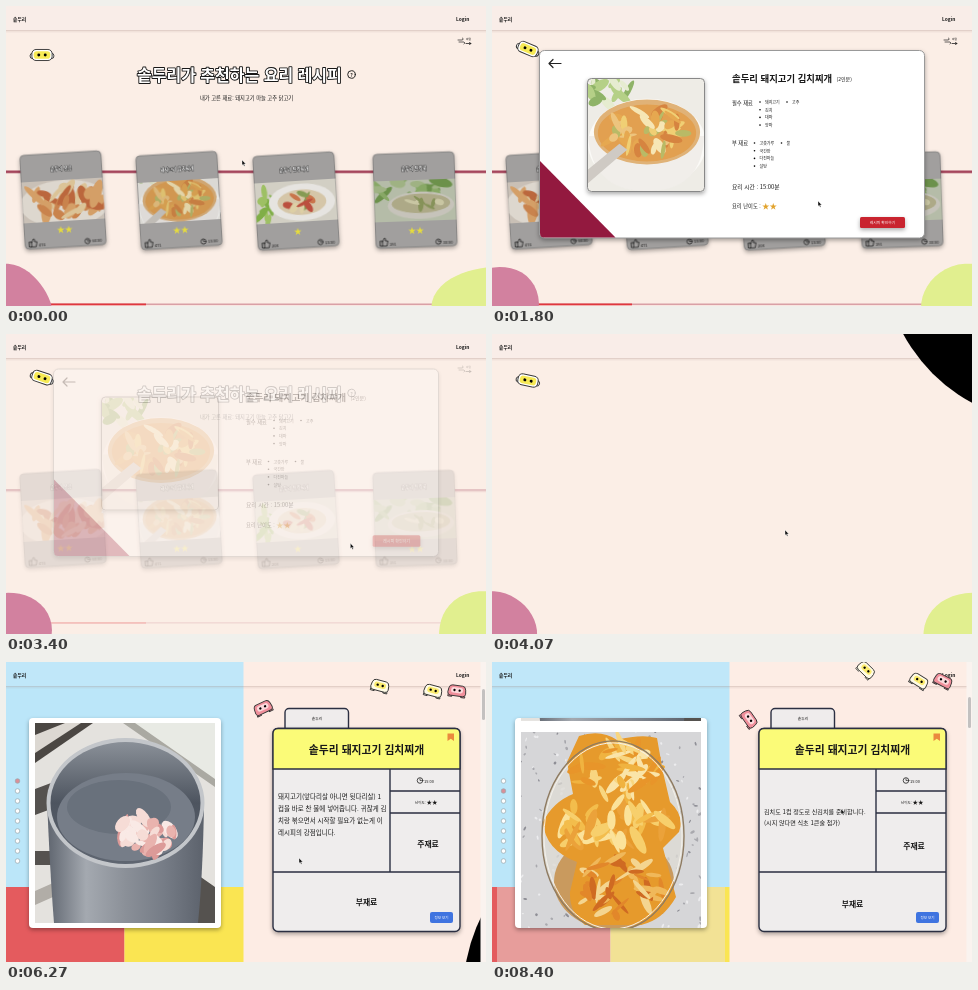
An HTML page for the animation above (8470 ms loop, 480 px wide and 300 px high).

```html
<!DOCTYPE html>
<html lang="ko">
<head>
<meta charset="utf-8">
<style>
html, body { margin: 0; width: 100%; height: 100%; overflow: hidden; background: #fbeee6; }
svg { display: block; }
#stage { width: 480px; height: 300px; }
text { font-family: "Noto Sans CJK KR", "Noto Sans CJK", "Noto Sans", sans-serif; font-weight: 500; dominant-baseline: central; fill: #181818; }
.b { font-weight: 700; }
.m { text-anchor: middle; }
.w { fill: #fff; }
.out { fill: #fff; stroke: #181818; paint-order: stroke; stroke-linejoin: round; font-weight: 700; }
.ln { fill: none; stroke: #222; stroke-linecap: round; stroke-linejoin: round; }
.ink { stroke: #2b2f42; stroke-width: 1.4; }
.sh { filter: drop-shadow(0 2px 2px #0005); }
</style>
</head>
<body>
<svg id="stage" viewBox="0 0 480 300"></svg>
<script>
const LOOP = 8470, BRAND = '솥두리';
const DISH = BRAND + ' 돼지고기 김치찌개';

const T = (x, y, size, str, cls = '', more = '') =>
  `<text x="${x}" y="${y}" font-size="${size}" class="${cls}" ${more}>${str}</text>`;
const R = (x, y, w, h, fill, more = '') =>
  `<rect x="${x}" y="${y}" width="${w}" height="${h}" fill="${fill}" ${more}/>`;
const O = (cx, cy, rx, ry, fill, more = '') =>
  `<ellipse cx="${cx}" cy="${cy}" rx="${rx}" ry="${ry}" fill="${fill}" ${more}/>`;
const P = (d, fill, more = '') => `<path d="${d}" fill="${fill}" ${more}/>`;
const L = (d, w = 1) => `<path d="${d}" class="ln" stroke-width="${w}"/>`;
const G = (id, body, more = '') => `<g id="${id}" ${more}>${body}</g>`;
const photo = (id, x, y, w, h, more = '') =>
  `<use href="#${id}" x="${x}" y="${y}" width="${w}" height="${h}" ${more}/>`;
const clock = (x, y, r) =>
  `<circle cx="${x}" cy="${y}" r="${r}" class="ln" stroke-width=".8"/>` + L(`M${x} ${y - r * .6}v${r * .6}h${r * .5}`, .7);
const blend = (id, x2, y2, ...colors) => `<linearGradient id="${id}" x2="${x2}" y2="${y2}">` +
  colors.map((c, i) => `<stop offset="${i / (colors.length - 1)}" stop-color="${c}"/>`).join('') + '</linearGradient>';

function seeded(n) {
  return () => (n = (n * 16807) % 2147483647) / 2147483647;
}
// Scattered strips or chunks inside an ellipse
function scatter(seed, count, cx, cy, rx, ry, size, colors, thin = .4) {
  const rnd = seeded(seed);
  let s = '';
  for (let i = 0; i < count; i++) {
    const a = rnd() * 6.283, q = Math.sqrt(rnd());
    const x = (cx + Math.cos(a) * rx * q).toFixed(1), y = (cy + Math.sin(a) * ry * q).toFixed(1);
    s += O(x, y, (size * (.7 + rnd())).toFixed(1), (size * thin * (.6 + rnd())).toFixed(1),
      colors[i % colors.length], `transform="rotate(${(rnd() * 180) | 0} ${x} ${y})"`);
  }
  return s;
}
const symbol = (id, w, h, body) =>
  `<symbol id="${id}" viewBox="0 0 ${w} ${h}" preserveAspectRatio="xMidYMid slice">${body}</symbol>`;

const soup = symbol('soup', 118, 114,
  R(0, 0, 118, 114, '#eeece6') + scatter(5, 16, 18, 12, 28, 14, 8, ['#8fb368', '#b5d087', '#e6ecd0']) +
  O(60, 66, 60, 46, '#fbfaf7') + P('M0 58Q4 114 60 114T118 58Z', '#f1eeea') +
  O(60, 54, 54, 33, '#e0b277') + O(60, 55, 50, 29, '#e2a050') +
  scatter(11, 44, 60, 53, 42, 22, 7, ['#f0cf74', '#e6a850', '#f6e6b4', '#d68440', '#edc47e', '#b9ba66']) +
  P('M0 92l22-18 10-8 8 6-12 10L0 106Z', '#cfcac4'));
const noodle = symbol('noodle', 84, 42,
  R(0, 0, 84, 42, '#d9cfc4') + O(44, 24, 46, 24, '#f0e9df') +
  scatter(21, 34, 44, 22, 36, 15, 9, ['#d98a4c', '#e6a96a', '#c96a3a', '#eed3a0']));
const plate = symbol('plate', 84, 42,
  R(0, 0, 84, 42, '#e4e0d4') + scatter(8, 10, 10, 22, 14, 20, 7, ['#86bb45', '#a8cf66']) +
  O(48, 22, 34, 19, '#faf8f4') + O(48, 22, 25, 13, '#e7d6b4') +
  scatter(31, 12, 48, 21, 18, 8, 6, ['#d97a4a', '#f0e0b0', '#8ca553', '#c9503c']));
const broth = symbol('broth', 84, 42,
  R(0, 0, 84, 42, '#c3cbb4') + scatter(17, 18, 34, 9, 44, 10, 8, ['#6f9a4a', '#8fb469', '#a9bf8a']) +
  O(48, 26, 34, 14, '#d6d3c8') + O(48, 24, 30, 10, '#b9b58e') + scatter(3, 8, 48, 24, 20, 6, 5, ['#8d9b5a', '#d9d6ae']));
const pot = symbol('pot', 180, 200,
  R(0, 0, 180, 200, '#e4e2de') + P('M0 0H58L0 40Z', '#4b4743') + P('M0 12L30 0H46L0 30Z', '#dcd8d2') +
  P('M92 0H180V62Z', '#e8eae4') + P('M100 0l80 56v8L88 0Z', '#aaa9a2') +
  P('M0 66L16 60V86L0 92ZM0 128h18v14H0ZM160 150l20 14v36h-26Z', '#55524f') + P('M0 168l18-8v14L0 182Z', '#b1ada7') +
  P('M12 76Q15 150 19 200H163Q168 150 169 80Z', 'url(#steel)') +
  O(90.5, 80, 79, 65, '#c3c6ca') + O(90.5, 80, 75, 61, 'url(#inner)') +
  O(91, 94, 69, 44, '#767d88') + O(84, 84, 52, 27, '#69717c') +
  scatter(9, 46, 110, 111, 31, 18, 7, ['#e9b3ae', '#f6dcd6', '#dc9a98', '#f9e9e5'], .55));
const kimchi = symbol('kimchi', 180, 200,
  R(0, 0, 180, 200, '#d6d6d8') + scatter(41, 260, 90, 100, 130, 130, 1.5, ['#a9a9ae', '#ececee', '#8f8f96'], .6) +
  O(92, 104, 72, 96, '#dedbd4', 'opacity=".75"') + O(93, 150, 60, 48, '#c99a5e') +
  P('M58 4Q80-3 96 8Q120 2 136 6L142 40 149 70Q164 84 158 100L142 116 155 165Q142 188 120 193H64Q48 180 49 160L56 130Q24 118 22 90Q32 70 52 62L46 30Z', '#e69a2c') +
  scatter(13, 42, 97, 38, 40, 28, 9, ['#f0b340', '#f8d680', '#e8952a', '#fae4a8'], .3) +
  scatter(18, 46, 88, 91, 56, 22, 10, ['#f3bd4c', '#fbe29a', '#eba23a', '#f7cf6c'], .35) +
  scatter(14, 44, 101, 156, 43, 30, 8, ['#e2872a', '#f0b85a', '#cf6a22', '#f4d590'], .3) +
  `<ellipse cx="92" cy="104" rx="71" ry="95" fill="none" stroke="#8e7b62" stroke-width="1.4"/>
  <ellipse cx="92" cy="104" rx="69" ry="93" fill="none" stroke="#f4f1ea" stroke-width="1"/>`);

const bot = `<g id="bot"><path d="M-10-2q-3 0-3 3t3 3M10-2q3 0 3 3t-3 3" fill="#fff" stroke="#333"/>
  <rect x="-11" y="-6" width="22" height="12" rx="4.5" fill="#fff" stroke="#333"/>
  <rect x="-9" y="-4.2" width="18" height="8.4" rx="3.4" fill="currentColor"/>
  <circle cx="-3.5" r="1.6"/><circle cx="3.5" r="1.6"/></g>`;
const pill = `<g id="pill"><path d="M-8.500 4.500v1.500h4V4.500M4.500 4.500v1.500h4V4.500" fill="currentColor" stroke="#333" stroke-width=".9"/>
  <path d="M-5-5.500H5Q8 -5.500 8.500-2L9 2Q9 5 6 5H-6Q-9 5-9 2L-8.500-2Q-8-5.500-5-5.500Z" fill="currentColor" stroke="#333" stroke-width=".9"/>
  <rect x="-6" y="-3.500" width="12" height="5.600" rx="2.600" style="fill:var(--face)"/>
  <circle cx="-2.600" cy="-.7" r="1.2"/><circle cx="2.600" cy="-.7" r="1.2"/></g>`;

function card(x, y, tilt, pic, title, stars, likes, time) {
  return `<g transform="translate(${x} ${y}) rotate(${tilt})" class="sh">` +
    R(-40.5, -47, 81, 94, '#a19f9e', 'rx="4" stroke="#777" stroke-width=".7"') +
    T(0, -32, 4.4, title, 'out m', 'stroke-width=".6"') +
    photo(pic, -40.5, -20, 81, 41) + R(-40.5, -20, 81, 41, '#555', 'opacity=".12"') +
    T(0, 29, 8, '★'.repeat(stars), 'm', 'style="fill:#e6dc3c"') +
    L('M-36 40h2v5h-2ZM-34 41l2-4q2 0 1 3h2.500l-1 5h-4.500', .8) + T(-27, 43, 4, likes) +
    clock(22, 42.5, 2.6) + T(26.500, 42.5, 4, time) + '</g>';
}
const header = (id, tint) => G(id, R(0, 0, 480, 24, '#f9ece8', `opacity="${tint}"`) +
  R(0, 24, 480, 1, '#a58c84', 'opacity=".3"') + R(0, 25, 480, 1.5, '#a58c84', 'opacity=".12"') +
  T(7, 12, 4.800, BRAND, 'b') + T(450, 12, 4.900, 'Login', 'b'));

const cards =
  card(57, 194, -3.5, 'noodle', BRAND + ' 볶음', 2, '474', '60:00') +
  card(173, 194.5, -3.5, 'soup', '돼지고기 김치찌개', 2, '471', '15:00') +
  card(290, 195, -3.5, 'plate', BRAND + ' 된장찌개', 1, '208', '15:00') +
  card(409, 194, -2, 'broth', BRAND + ' 된장국', 2, '191', '30:00');

const items = (x, y, step, names) => names.map((n, i) =>
  `<circle cx="${x}" cy="${y + i * step}" r=".8"/>` + T(x + 5, y + i * step, 4, n)).join('');

const modal = G('modal',
  R(47.5, 44.5, 385, 187.5, '#fff', 'rx="5" stroke="#999" class="sh"') +
  P('M48 155L123.500 231.500H52Q48 231.500 48 227Z', '#93193f') + L('M69 57.500H57M61 53.500L57 57.500L61 61.500', 1.2) +
  R(95, 72, 118, 114, '#eee', 'rx="4" class="sh"') + photo('soup', 96, 73, 116, 112) +
  R(95.5, 72.5, 117, 113, 'none', 'rx="4" stroke="#888"') +
  T(240, 72, 9.4, DISH, 'b') + T(344.500, 72.500, 5, '(2인분)') +
  T(240, 97, 5.3, '필수 재료') + items(268, 96, 7.7, ['돼지고기', '김치', '대파', '양파']) + items(295, 96, 0, ['고추']) +
  T(240, 137, 5.3, '부 재료') + items(262.500, 137, 7.7, ['고춧가루', '국간장', '다진마늘', '설탕']) + items(289.500, 137, 0, ['물']) +
  T(240, 180, 5.800, '요리 시간 : 15:00분') + T(240, 200, 5.300, '요리 난이도 :') +
  T(270, 199.5, 7.500, '★★', '', 'style="fill:#e2a32c"') +
  G('go', R(368, 211, 45, 11, '#c9242f', 'rx="1.5" class="sh"') + T(390.5, 216.5, 3.8, '레시피 확인하기', 'm w')));

const sceneA = G('list',
  G('page', R(0, 164.5, 480, 2.4, '#a5465d') + R(0, 167, 480, 1, '#a5465d', 'opacity=".25"') +
    R(0, 297.5, 480, 1.6, '#d9a0a6') + R(0, 297.5, 140, 1.8, '#e0383f') +
    T(131, 68, 16, BRAND + '가 추천하는 요리 레시피', 'out', 'stroke-width="1.8"') +
    `<circle cx="345.500" cy="68.500" r="3.800" class="ln" stroke-width="1"/>` + T(345.5, 68.500, 5, '?', 'm b') +
    T(194, 92, 5.3, '내가 고른 재료: 돼지고기 마늘 고추 닭고기') + cards) +
  L('M452 34h4.500q1.500-1.500 0-2M453 36h5q2 1 0 2', .7) + T(460, 32.500, 2.800, '바람') + L('M460 37.500h5M463.500 36.500l1.500 1-1.500 1', .8));

const YELLOW = 'color:#fffbe6;--face:#fbec6e', PINK = 'color:#f08f9b;--face:#fbd9db';
const bots = [[YELLOW, 374], [YELLOW, 427], [PINK, 451], [PINK, 257]];
const body1 = ['돼지고기(앞다리살 아니면 뒷다리살) 1', '컵을 바로 찬 물에 넣어줍니다. 귀찮게 김', '치랑 볶으면서 시작할 필요가 없는게 이', '레시피의 강점입니다.'];
const body2 = ['김치도 1컵 정도로 신김치를 준비합니다.', '(시지 않다면 식초 1큰술 첨가)'];

const sceneB = G('recipe',
  R(0, 0, 480, 300, '#fdece4') + R(0, 0, 237.5, 225, '#bbe6f9') + R(0, 225, 118.5, 75, '#e45b5e') + R(118.5, 225, 119, 75, '#fae552') +
  R(0, 158, 237.5, 67, '#fff', 'id="haze" opacity="0"') + R(119, 225, 0, 75, '#ebdfd8', 'id="veil" opacity=".5"') +
  header('head2', .08) +
  bots.map(([style], i) => `<use href="#pill" id="pill${i}" style="${style}"/>`).join('') +
  G('dots', Array.from({ length: 9 }, (_, i) => `<circle cx="11.5" cy="${119 + i * 10}" r="2.3" fill="#fff" stroke="#9aa6ad" stroke-width=".7"/>`).join('')) +
  R(23, 56, 192, 210, '#fff', 'rx="4" class="sh"') +
  `<g clip-path="url(#frame)">` + G('photos', photo('pot', 29, 61, 180, 200) + photo('kimchi', 29, 272, 180, 200)) + '</g>' +
  R(279, 46.5, 63.5, 30, '#efecec', 'rx="4" class="ink"') + T(311, 56.5, 3.800, BRAND, 'm') +
  R(267, 66.500, 187, 203, '#efeded', 'rx="5" class="ink sh"') +
  P('M267 107V71.500Q267 66.500 272 66.500H449Q454 66.500 454 71.500V107Z', '#fbfb78', 'class="ink"') +
  P('M441.500 71.500h6.500v7.500l-3.200-2.200-3.300 2.200Z', '#ea8a3e') + T(360.5, 87, 10.8, DISH, 'b m') +
  `<g clip-path="url(#copy)">` + G('words', body1.map((s, i) => T(272, 134 + i * 12, 6.5, s)).join('') +
    body2.map((s, i) => T(272, 234 + i * 11, 6.1, s)).join('')) + '</g>' +
  P('M384 107V210M384 129H454M384 151H454M267 210H454', 'none', 'class="ink"') +
  clock(414, 118.5, 2.8) + T(418, 118.5, 4, '15:00') + T(409, 140.500, 3.600, '난이도:') + T(420.500, 139.5, 5.500, '★★') +
  G('labels', T(422, 181, 7.8, '주재료', 'b m') + T(360.5, 239.5, 7.8, '부재료', 'b m')) +
  R(424, 250, 23, 11, '#3f74e0', 'rx="2"') + T(435.5, 255.5, 3.6, '정보 보기', 'm w'));

const stage = document.getElementById('stage');
stage.innerHTML = '<defs>' + blend('steel', 1, 0, '#5f656f', '#a4a9b0', '#8b9098', '#767c86', '#5c626c') +
  blend('inner', 0, 1, '#8a9098', '#4d545f', '#5f6671') +
  soup + noodle + plate + broth + pot + kimchi + bot + pill +
  `<clipPath id="frame"><rect x="23" y="56" width="192" height="210" rx="4"/></clipPath>
  <clipPath id="copy"><rect x="268" y="107.500" width="115.500" height="102"/></clipPath></defs>` +
  G('first', R(0, 0, 480, 300, '#fbeee6') + header('head1', .75) + sceneA +
    G('blobs', P('', '#d2819f', 'id="blobL"') + P('', '#e1ef8f', 'id="blobR"')) +
    `<use href="#bot" id="pal" style="color:#f7ea55"/>` + modal) +
  sceneB + '<circle id="hole"/>' +
  G('bar', R(474.5, 0, 5.5, 300, '#faf3ef') + R(476, 27, 3, 31, '#c3c1c0', 'id="thumb" rx="1.5"')) +
  P('M0 0V5.200L1.200 4.200L2.100 6.200L3 5.800L2.200 3.900H3.800Z', '#111', 'id="mouse" stroke="#fff" stroke-width=".4"');

const el = Object.fromEntries([...stage.querySelectorAll('[id]')].map(n => [n.id, n]));
const set = (id, name, v) => el[id].setAttribute(name, v);
const show = (id, on) => set(id, 'display', on ? 'inline' : 'none');
const clamp = (v) => Math.max(0, Math.min(1, v));
const smooth = (v) => v * v * (3 - 2 * v);

// Rows are [time, value, value...]
function track(rows, t, ease = (v) => v) {
  let i = 0;
  while (i < rows.length - 2 && t >= rows[i + 1][0]) i++;
  const a = rows[i], b = rows[i + 1], p = ease(clamp((t - a[0]) / (b[0] - a[0])));
  return a.slice(1).map((v, k) => v + (b[k + 1] - v) * p);
}

const MOUSE = [[0, 236, 154], [650, 190, 188], [1000, 190, 188], [1700, 326, 195], [2100, 326, 195], [2750, 378, 218], [3100, 378, 218], [3800, 293, 196], [7400, 293, 196], [7800, 311, 151], [8050, 311, 151], [8350, 349, 147]];
const PAL = [[0, 49, 0], [870, 48.6, 1], [1800, 43, 23], [2700, 40.5, 26], [4070, 46.5, 12], [4600, 49, 3]];
const PAGE = [[1850, 0], [2500, -9.5]];
const COVER = [[3880, 105], [4070, 168], [4250, 340], [4400, 520], [4600, 700]];
const REVEAL = [[5600, 720], [5800, 590], [6000, 380], [6270, 172], [6400, 130]];
const SCROLL = [[7550, 0], [7700, 14], [7870, 63], [8130, 148], [8400, 202], [8470, 209]];
const LABELS = [[7500, 0], [7840, -17], [7900, -17], [8200, 2]];
const PILLS = [
  [[5600, 28, 2], [6270, 24, 15], [7270, 12, 32], [7870, 11, 40], [8400, 8, 44]],
  [[5600, 31, 5], [6270, 29, 15], [7270, 23, 26], [7870, 20, 30], [8400, 19, 32]],
  [[5600, 32, 0], [6270, 29, 8], [7270, 22, 20], [7870, 19, 25], [8400, 19, 27]],
  [[5600, 42, -32], [6270, 46, -25], [7270, 53, 40], [7870, 56, 65], [8400, 57, 55]]
];

function blob(cx, cy, rx, ry, phase) {
  let d = '';
  for (let i = 0; i < 48; i++) {
    const a = i / 48 * Math.PI * 2, q = 1 + .05 * Math.sin(2 * a + phase) + .03 * Math.sin(3 * a - phase);
    d += (i ? 'L' : 'M') + (cx + rx * q * Math.cos(a)).toFixed(2) + ' ' + (cy + ry * q * Math.sin(a)).toFixed(2);
  }
  return d + 'Z';
}

function draw(t) {
  const first = t < 4600;
  show('first', first);
  show('recipe', !first);
  show('bar', t >= 5000);

  if (first) {
    const dy = track(PAGE, t, smooth)[0];
    const [py, pr] = track(PAL, t, smooth);
    const gone = 1 - clamp((t - 3250) / 200);
    set('page', 'transform', `translate(0 ${dy})`);
    set('list', 'opacity', gone);
    set('pal', 'transform', `translate(36 ${py}) rotate(${pr}) scale(.92)`);
    set('blobL', 'd', blob(2, 302, 44, 43, t / 900));
    set('blobR', 'd', blob(480, 302, 51, 43, 2 - t / 900));

    const p = clamp((t - 950) / 600), q = p - 1;
    const back = 1 + 2.7 * q * q * q + 1.7 * q * q;
    const s = .2 + .8 * back;
    show('modal', p > 0 && gone > 0);
    set('modal', 'opacity', Math.min(clamp(p * 4), gone));
    set('modal', 'transform', `translate(${173 + 67 * back} ${195 - 57 * back + dy}) scale(${s}) translate(-240 -138)`);
    const hover = 1 + .06 * clamp((t - 2600) / 150);
    set('go', 'transform', `translate(390.5 216.5) scale(${hover}) translate(-390.5 -216.5)`);
  } else {
    const s = track(SCROLL, t)[0], fade = clamp((t - 7870) / 500);
    set('photos', 'transform', `translate(0 ${-s})`);
    set('words', 'transform', `translate(0 ${-s * .416})`);
    set('labels', 'transform', `translate(0 ${track(LABELS, t, smooth)[0]})`);
    set('thumb', 'y', 27 + Math.min(8, s * .12));
    const half = Math.max(0, Math.min(114, (t - 7625) * .147));
    set('veil', 'x', 119 - half);
    set('veil', 'width', half * 2);
    set('haze', 'opacity', .2 * clamp((t - 7600) / 200) * (1 - fade));
    [...el.dots.children].forEach((c, i) =>
      c.setAttribute('fill', (i === 0 && s < 40) || (i === 1 && s > 150) ? '#d98f98' : '#fff'));
    bots.forEach(([, x], i) => {
      const [y, r] = track(PILLS[i], t);
      set('pill' + i, 'transform', `translate(${x} ${y}) rotate(${r})`);
    });
  }

  show('hole', t >= 3880 && t < 6420);
  const leaving = t >= 5600;
  set('hole', 'cx', leaving ? 629 : 560);
  set('hole', 'cy', leaving ? 331 : -80);
  set('hole', 'r', track(leaving ? REVEAL : COVER, t)[0]);

  const [mx, my] = track(MOUSE, t, smooth);
  show('mouse', t < 4400 || t > 5900);
  set('mouse', 'transform', `translate(${mx} ${my})`);
}

const start = performance.now();
function tick() {
  draw((performance.now() - start) % LOOP);
  requestAnimationFrame(tick);
}
tick();
</script>
</body>
</html>
```
